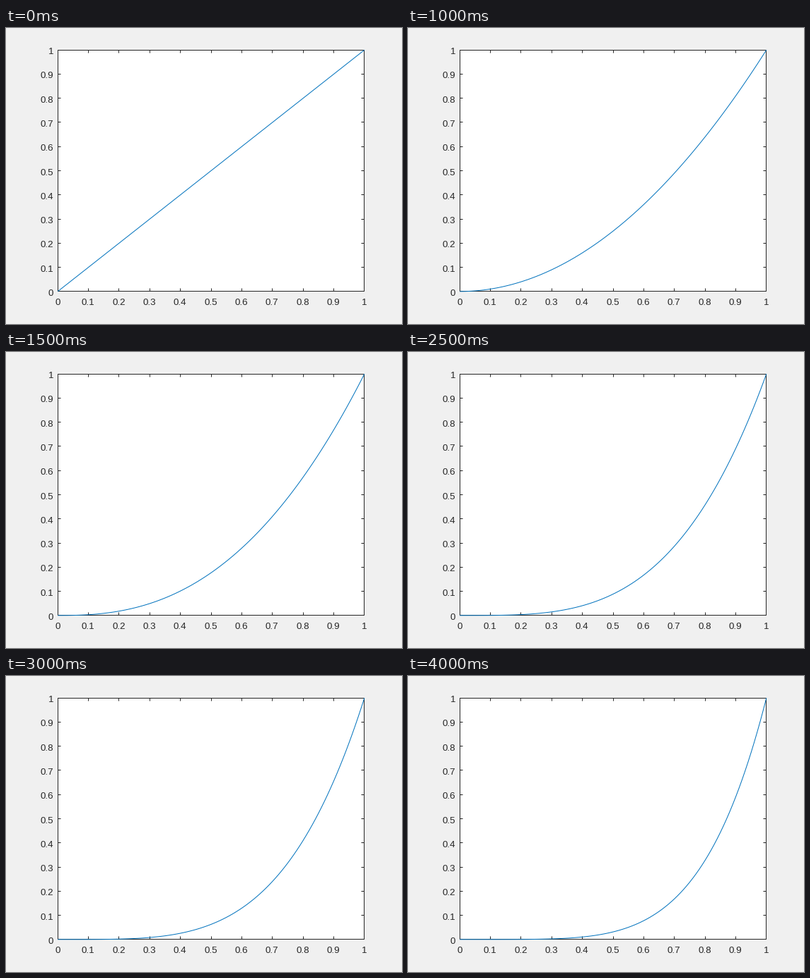
A matplotlib script for the animation above (4500 ms loop, 560 by 420 pixels).

```python
import numpy as np
import matplotlib.pyplot as plt
from matplotlib.animation import FuncAnimation
from matplotlib.collections import LineCollection
from matplotlib.patches import Rectangle

W, H, DPI = 560, 420, 100
PX = 72 / DPI  # one pixel in points
LEFT, RIGHT, TOP, BOTTOM = 73.2, 506.8, 31.2, 373.8
TICK = 4.34
INK = "#262626"

plt.rcParams["font.family"] = "Liberation Sans"

fig = plt.figure(figsize=(W / DPI, H / DPI), dpi=DPI, facecolor="#f0f0f0")
ax = fig.add_axes([0, 0, 1, 1])
ax.set_xlim(0, W)
ax.set_ylim(H, 0)
ax.axis("off")


def to_x(u):
    return LEFT + (RIGHT - LEFT) * u


def to_y(v):
    return BOTTOM - (BOTTOM - TOP) * v


def pixel_center(p):
    return np.floor(p) + 0.5


def label(x, y, text, ha):
    ax.text(x, y, text, ha=ha, va="baseline", size=13.333 * PX, color=INK)


# The frame and ticks sit on whole pixels, the curve does not.
x0, x1, y0, y1 = (pixel_center(p) for p in (LEFT, RIGHT, TOP, BOTTOM))
ax.add_patch(Rectangle((x0, y0), x1 - x0, y1 - y0,
                       facecolor="white", edgecolor=INK, lw=PX,
                       snap=False, zorder=1))

ticks = []
for k in range(11):
    u = k / 10
    x, y = pixel_center(to_x(u)), pixel_center(to_y(u))
    ticks += [
        [(x, y1), (x, BOTTOM - TICK)],
        [(x, y0), (x, TOP + TICK)],
        [(x0, y), (LEFT + TICK, y)],
        [(x1, y), (RIGHT - TICK, y)],
    ]
    label(to_x(u) - 0.5, 393, f"{u:g}", "center")
    label(67, round(to_y(u) + 6.02), f"{u:g}", "right")

marks = LineCollection(ticks, colors=INK, linewidths=PX, zorder=2)
marks.set_snap(False)
ax.add_collection(marks)

t = np.linspace(0, 1, 101)
curve, = ax.plot(to_x(t), to_y(t), color="#0072bd", lw=PX, zorder=3,
                 solid_capstyle="butt", snap=False)


def draw(i):
    power = 1 + i / 2
    curve.set_ydata(to_y(t ** power))
    return [curve]


anim = FuncAnimation(fig, draw, frames=9, interval=500,
                     repeat=True, repeat_delay=0)
plt.show()
```
